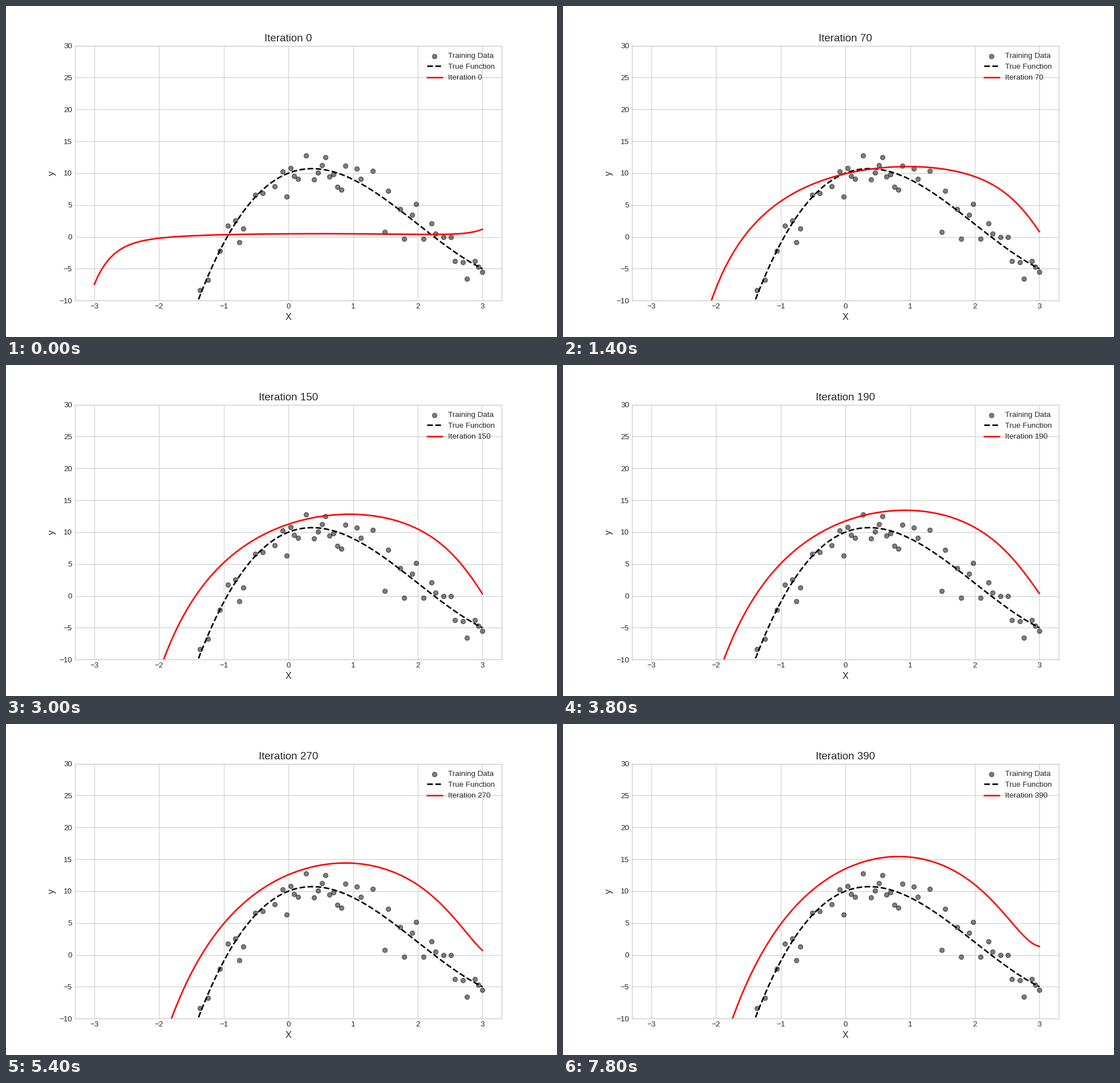
A matplotlib script that plays this animation: 966 by 580 pixels, repeating every 8 s.

```python
import numpy as np
import matplotlib.pyplot as plt
from matplotlib.animation import FuncAnimation

W, H, DPI = 966, 580, 96.6
FRAMES, INTERVAL, STRIDE = 40, 200, 10
DEGREE, RATE = 15, 0.01

plt.style.use("seaborn-v0_8-whitegrid")
plt.rcParams["font.family"] = "Liberation Sans"


def cubic(x):
    return x**3 - 6 * x**2 + 4 * x + 10


def powers(x):
    return x[:, None] ** np.arange(1, DEGREE + 1)


# Noisy samples of the cubic; 60 of the 100 are used for training.
rng = np.random.RandomState(42)
x = np.linspace(-3, 3, 100)
y = cubic(x) + rng.normal(0, 2, x.size)
weights = 0.1 * rng.randn(DEGREE + 1)[1:]
train = np.random.RandomState(42).permutation(x.size)[40:]

raw = powers(x[train])
mean, std = raw.mean(axis=0), raw.std(axis=0)
features = (raw - mean) / std
basis = (powers(x) - mean) / std


def descend(w):
    """Gradient descent on standardised features; one curve per frame."""
    curves = []
    for step in range((FRAMES - 1) * STRIDE + 1):
        error = features @ w - y[train]
        w = w - RATE * features.T @ error / len(train)
        if step % STRIDE == 0:
            curves.append(basis @ w)
    return curves


curves = descend(weights)

# The tiny margin keeps the pixel size from rounding down.
fig, ax = plt.subplots(figsize=((W + 1e-6) / DPI, (H + 1e-6) / DPI), dpi=DPI)
ax.scatter(x[train], y[train], color="black", alpha=0.5, label="Training Data")
ax.plot(x, cubic(x), "k--", lw=2, label="True Function")
fit, = ax.plot(x, curves[0], color="red", lw=2, label="Iteration 0")
ax.set_xlim(-3.3, 3.3)
ax.set_ylim(-10, 30)
ax.set_xlabel("X", fontsize=12)
ax.set_ylabel("y", fontsize=12)
title = ax.set_title("Iteration 0", fontsize=14)
entry = ax.legend(loc="upper right", fontsize=10).get_texts()[2]


def update(i):
    name = f"Iteration {i * STRIDE}"
    fit.set_ydata(curves[i])
    title.set_text(name)
    entry.set_text(name)
    return fit, title, entry


anim = FuncAnimation(fig, update, frames=FRAMES, interval=INTERVAL,
                     repeat=True, repeat_delay=0, blit=False)
plt.show()
```
